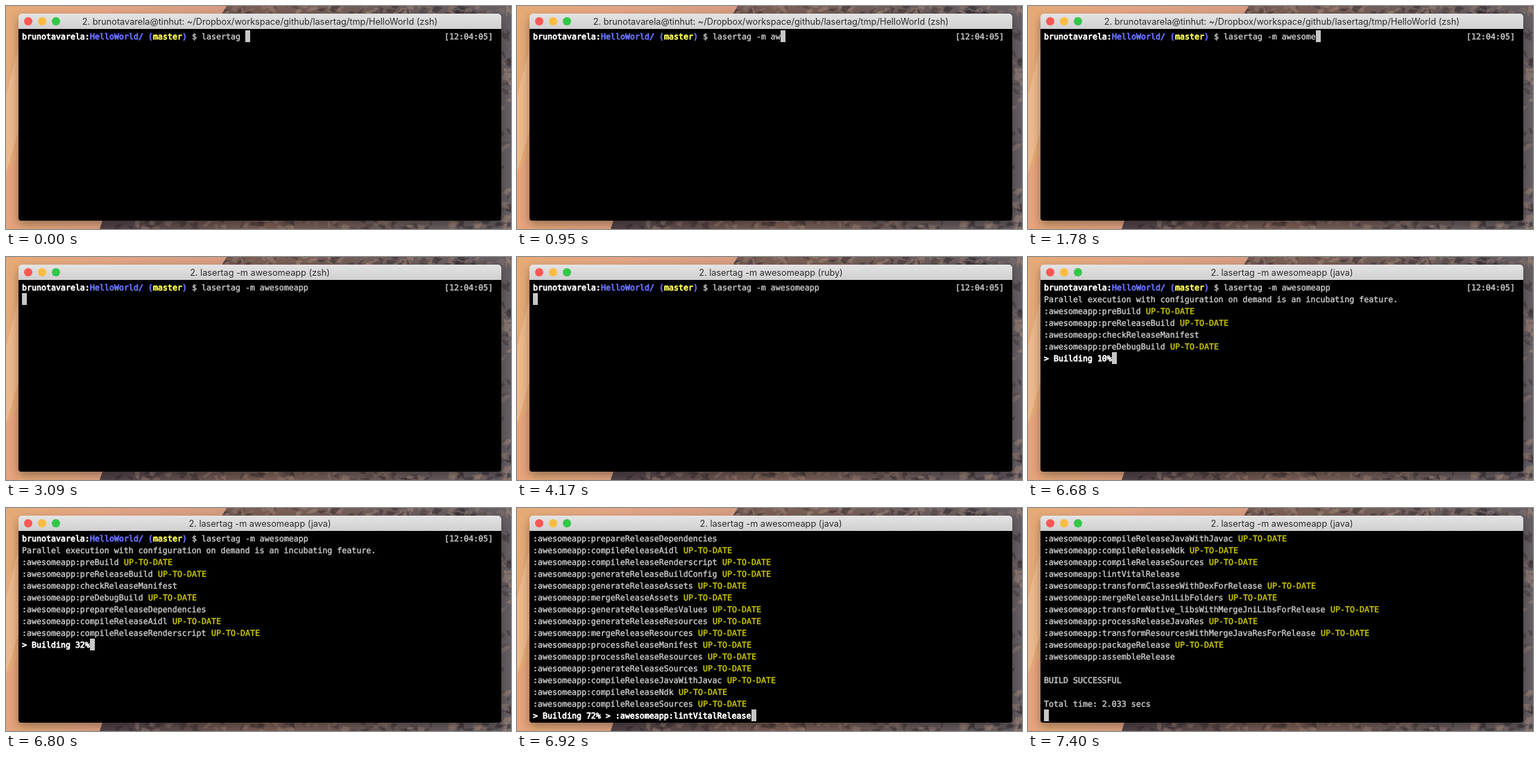
Write an HTML page that moves like this. It is 728x321 px and loops after 8 s.

```html
<!DOCTYPE html>
<html lang="en">
<head>
<meta charset="utf-8">
<title>Terminal build</title>
<style>
  html, body { margin: 0; width: 100%; height: 100%; overflow: hidden; background: #000; }
  svg { display: block; width: 728px; height: 321px; }
  text { white-space: pre; }
  #title { font: 12.7px Inter, Roboto, sans-serif; fill: #2c2c2c; text-anchor: middle; }
  #screen {
    font: 11.628px "DejaVu Sans Mono", monospace; text-rendering: geometricPrecision;
    stroke-width: .45px; stroke-linejoin: round;
  }
  #screen .plain { fill: #c7c7c7; stroke: #c7c7c7; }
  #screen .done { fill: #c7c400; stroke: #c7c400; }
  #screen .user, #screen .status { fill: #fff; stroke: #fff; stroke-width: .8px; }
  #screen .dir { fill: #6871ff; stroke: #6871ff; stroke-width: .8px; }
  #screen .branch { fill: #ffff55; stroke: #ffff55; stroke-width: .8px; }
</style>
</head>
<body>
<svg viewBox="0 0 728 321" xmlns="http://www.w3.org/2000/svg">
  <defs>
    <linearGradient id="sand" x2="1" y2="0">
      <stop offset="0" stop-color="#e6aa76"/>
      <stop offset=".2" stop-color="#e2a585"/>
      <stop offset=".5" stop-color="#d39a80"/>
    </linearGradient>
    <linearGradient id="rock" gradientUnits="userSpaceOnUse" x1="135" x2="728">
      <stop offset="0" stop-color="#50434a"/>
      <stop offset=".4" stop-color="#7c6056"/>
      <stop offset=".75" stop-color="#6c5d5c"/>
      <stop offset="1" stop-color="#655e64"/>
    </linearGradient>
    <linearGradient id="bar" x2="0" y2="1">
      <stop offset="0" stop-color="#e4e4e4"/>
      <stop offset="1" stop-color="#d0d0d0"/>
    </linearGradient>
    <filter id="blur" x="-10%" y="-10%" width="120%" height="125%"><feGaussianBlur stdDeviation="7"/></filter>
    <clipPath id="cliff"><path d="M318 0H728V321H135L142 300Z"/></clipPath>
  </defs>
  <rect width="728" height="321" fill="url(#sand)"/>
  <path d="M0 130L18 60V180L0 240Z" fill="#edb98c"/>
  <path d="M0 240L18 215V321H0Z" fill="#e6a37c"/>
  <g clip-path="url(#cliff)">
    <rect width="728" height="321" fill="url(#rock)"/>
    <g id="cracks"></g>
  </g>
  <rect x="18" y="17" width="696" height="297" rx="5" opacity=".35" filter="url(#blur)"/>
  <path d="M18 33V16a5 5 0 0 1 5-5H709a5 5 0 0 1 5 5V33Z" fill="url(#bar)"/>
  <path d="M18 33H714V305a4 4 0 0 1-4 4H22a4 4 0 0 1-4-4Z"/>
  <circle cx="32" cy="22" r="6" fill="#fc5753"/>
  <circle cx="52" cy="22" r="6" fill="#fdbc40"/>
  <circle cx="72" cy="22" r="6" fill="#33c748"/>
  <text id="title" x="366" y="27"></text>
  <g id="screen"></g>
  <rect id="cursor" width="7" height="17" fill="#c7c7c7"/>
</svg>
<script>
const LOOP = 8000, LEFT = 23, TOP = 35, CELL = 7, LINE = 17, ROWS = 16;
const $ = id => document.getElementById(id);

// Slanted flakes that give the cliff its texture along the stage edges.
function drawCracks() {
  let seed = 7;
  const rand = (min, max) => {
    seed = (seed * 16807) % 2147483647;
    return min + (max - min) * seed / 2147483647;
  };
  const flake = (x, y) => {
    const w = rand(3, 14), h = rand(4, 11), lean = rand(-12, 4);
    const color = rand(0, 1) < .5 ? '#33292c' : '#a78b7c';
    return `<path d="M${x} ${y}l${w} ${rand(-3, 3)}l${lean} ${h}l${-w * .6} ${-h * .3}Z" ` +
      `fill="${color}" opacity="${rand(.2, .55)}"/>`;
  };
  let html = '';
  for (let i = 0; i < 90; i++) {
    html += flake(rand(315, 728), rand(-5, 9));
    html += flake(rand(135, 728), rand(306, 320));
    if (i % 2) html += flake(rand(708, 726), rand(0, 321));
  }
  $('cracks').innerHTML = html;
}

// A line is a list of [text, class] runs; a run may carry its own column.
const plain = text => [[text, 'plain']];
const status = text => [[text, 'status']];
const task = (name, done = true) => {
  const line = plain(':awesomeapp:' + name + ' ');
  return done ? [...line, ['UP-TO-DATE', 'done']] : line;
};
const prompt = command => [
  ['brunotavarela:', 'user'], ['HelloWorld/ (', 'dir'], ['master', 'branch'],
  [') ', 'dir'], ['$ ' + command, 'plain'], ['[12:04:05]', 'plain', 87]
];

const ARGS = '-m awesomeapp';
const log = [
  prompt('lasertag ' + ARGS),
  plain('Parallel execution with configuration on demand is an incubating feature.'),
  task('preBuild'), task('preReleaseBuild'),
  task('checkReleaseManifest', false), task('preDebugBuild'),
  task('prepareReleaseDependencies', false),
  ...['compileReleaseAidl', 'compileReleaseRenderscript', 'generateReleaseBuildConfig',
    'generateReleaseAssets', 'mergeReleaseAssets', 'generateReleaseResValues',
    'generateReleaseResources', 'mergeReleaseResources', 'processReleaseManifest',
    'processReleaseResources', 'generateReleaseSources', 'compileReleaseJavaWithJavac',
    'compileReleaseNdk', 'compileReleaseSources'].map(name => task(name)),
  task('lintVitalRelease', false),
  ...['transformClassesWithDexForRelease', 'mergeReleaseJniLibFolders',
    'transformNative_libsWithMergeJniLibsForRelease', 'processReleaseJavaRes',
    'transformResourcesWithMergeJavaResForRelease', 'packageRelease'].map(name => task(name)),
  task('assembleRelease', false),
  plain(''), plain('BUILD SUCCESSFUL'), plain(''), plain('Total time: 2.033 secs')
];

// [start, characters typed]
const keys = [[0, 0], [120, 1], [360, 2], [590, 3], [830, 4], [950, 5], [1180, 6],
  [1420, 7], [1660, 8], [1780, 10], [2140, 11], [2380, 12], [2500, 13]];
// [start, log lines printed, status line]
const output = [[3090, 1, ''], [6560, 2, '> Building 0%'], [6680, 6, '> Building 10%'],
  [6800, 9, '> Building 32%'], [6920, 21, '> Building 72% > :awesomeapp:lintVitalRelease'],
  [7400, log.length, '']];
const titles = [
  [0, 'brunotavarela@tinhut: ~/Dropbox/workspace/github/lasertag/tmp/HelloWorld (zsh)'],
  ...[[3090, 'zsh'], [4170, 'ruby'], [6330, 'java']]
    .map(([at, job]) => [at, `lasertag ${ARGS} (${job})`])
];

const latest = (list, t) => list.filter(item => item[0] <= t).pop();

function drawRow(line, row) {
  let col = 0, end = 0, html = '';
  for (const [text, kind, fixed] of line) {
    const at = fixed ?? col;
    const safe = text.replace(/>/g, '&gt;');
    html += `<text class="${kind}" x="${LEFT + at * CELL}" y="${TOP + 13 + row * LINE}">${safe}</text>`;
    col = at + text.length;
    if (fixed === undefined) end = col;
  }
  return { html, end };
}

let shown = '';
function render(t) {
  const title = latest(titles, t)[1];
  const step = latest(output, t);
  const typed = latest(keys, t)[1];
  const state = title + typed + step;
  if (state === shown) return;
  shown = state;

  const lines = step
    ? [...log.slice(0, step[1]), status(step[2])].slice(-ROWS)
    : [prompt('lasertag ' + ARGS.slice(0, typed))];
  const rows = lines.map(drawRow);
  $('title').textContent = '2. ' + title;
  $('screen').innerHTML = rows.map(row => row.html).join('');
  $('cursor').setAttribute('x', LEFT + rows[rows.length - 1].end * CELL);
  $('cursor').setAttribute('y', TOP + (rows.length - 1) * LINE);
}

drawCracks();
const start = performance.now();
function tick() {
  render((performance.now() - start) % LOOP);
  requestAnimationFrame(tick);
}
tick();
</script>
</body>
</html>
```
